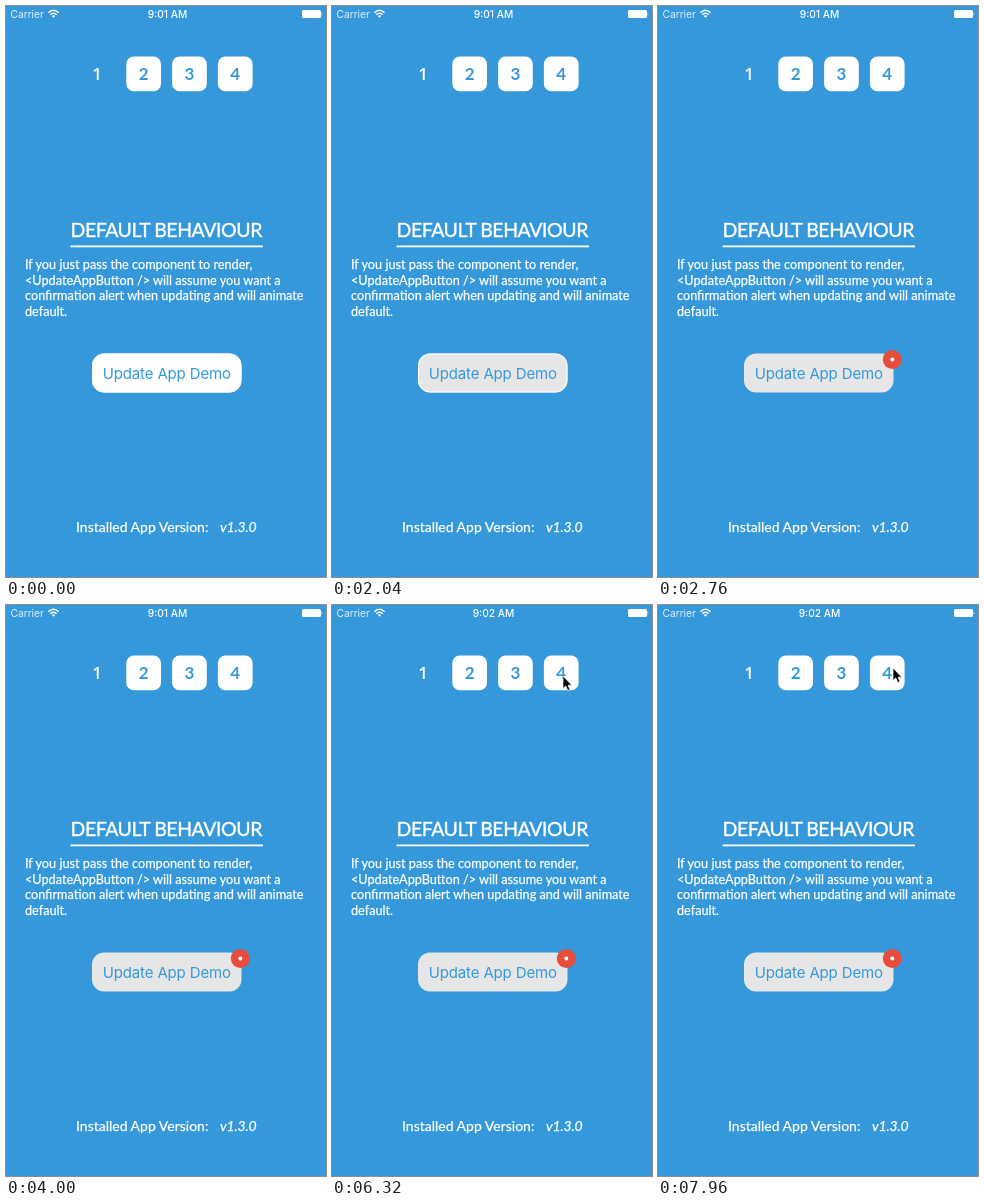
An HTML page for the animation above (8 s loop, 320 by 571 pixels).

```html
<!DOCTYPE html>
<html lang="en">
<head>
<meta charset="utf-8">
<title>Update button demo</title>
<style>
  html, body { margin: 0; width: 100%; height: 100%; overflow: hidden; background: #3498db; }
  svg { display: block; width: 100%; height: 100%; }
  text { fill: #fff; font: 12.7px Lato, sans-serif; white-space: pre; }
  .sturdy { stroke: #fff; stroke-width: .25px; }
  .status { font: 10.2px Inter, sans-serif; }
  .clock { font-weight: 500; text-anchor: middle; }
  .tab { font-size: 17px; font-weight: 700; fill: #3498db; text-anchor: middle; }
  .active { font: 600 17px "Open Sans", sans-serif; fill: #fff; }
  .title { font-size: 19.5px; letter-spacing: -.45px; stroke-width: .4px; }
  .label { font: 15px Inter, sans-serif; letter-spacing: -.15px; fill: #3498db; text-anchor: middle; }
  .version { font-size: 14px; }
  .number { font-style: italic; letter-spacing: -.2px; }
</style>
</head>
<body>
<svg viewBox="0 0 320 571">
  <rect width="320" height="571" fill="#3498db"/>

  <text class="status" x="4.5" y="11.5" opacity=".85">Carrier</text>
  <g fill="none" stroke="#fff" stroke-width="1.5">
    <path d="M42.4 6.7Q47.5 1.9 52.6 6.7M44.3 8.7Q47.5 5.8 50.7 8.7"/>
    <path d="M45.8 9.9Q47.5 8.5 49.2 9.9L47.5 11.8Z" fill="#fff" stroke="none"/>
  </g>
  <text class="status clock" id="clock" x="161.5" y="11.5">9:01 AM</text>
  <rect x="296" y="4" width="19" height="8" rx="1.5" fill="#fff"/>
  <path d="M315.6 6.3q1.7 1.7 0 3.4z" fill="#fff"/>

  <text class="tab active" x="91" y="74">1</text>
  <g id="tabs"></g>

  <text class="title sturdy" x="64.5" y="231">DEFAULT BEHAVIOUR</text>
  <rect x="64.5" y="239.5" width="192.5" height="1.8" fill="#fff"/>
  <text class="sturdy" y="263">
    <tspan x="19">If you just pass the component to render,</tspan>
    <tspan x="19" dy="15.7">&lt;UpdateAppButton /&gt; will assume you want a</tspan>
    <tspan x="19" dy="15.7">confirmation alert when updating and will animate</tspan>
    <tspan x="19" dy="15.7">default.</tspan>
  </text>

  <rect id="button" x="86" y="347.5" width="149.5" height="39" rx="12"/>
  <rect id="edge" x="86.5" y="348" width="148.5" height="38" rx="11.5" fill="none" stroke="#fff"/>
  <text class="label" x="160.8" y="373">Update App Demo</text>
  <g id="badge">
    <circle r="9.5" fill="#e74c3c"/>
    <circle r="2" fill="#fff"/>
  </g>

  <text class="version sturdy" x="70" y="526">Installed App Version:</text>
  <text class="version number sturdy" x="214" y="526">v1.3.0</text>

  <path id="cursor" d="M0 0V12.5L2.8 9.9L4.8 14.5L6.9 13.6L5 9.2H8.8Z"
        fill="#000" stroke="#fff" stroke-width=".7"/>
</svg>
<script>
const LOOP = 8000;
const part = id => document.getElementById(id);
const [clock, tabs, button, edge, badge, cursor] =
  ["clock", "tabs", "button", "edge", "badge", "cursor"].map(part);

tabs.innerHTML = [2, 3, 4].map((n, i) => {
  const x = 120.3 + i * 45.8;
  return `<rect x="${x}" y="50.6" width="34.7" height="34.7" rx="7.5" fill="#fff"/>
    <text class="tab" x="${x + 17.3}" y="74">${n}</text>`;
}).join("");

const progress = (t, from, to) => Math.min(1, Math.max(0, (t - from) / (to - from)));
const ease = p => p * p * (3 - 2 * p);
const mix = (a, b, p) => a + (b - a) * p;
const overshoot = p => 1 + 2.4 * (p - 1) ** 3 + 1.4 * (p - 1) ** 2;

function draw(t) {
  const shade = Math.round(mix(255, 230, ease(progress(t, 1800, 2000))));
  button.setAttribute("fill", `rgb(${shade},${shade},${shade})`);
  edge.setAttribute("opacity", 1 - progress(t, 2050, 2250));

  const size = Math.max(0, overshoot(progress(t, 2200, 2500)));
  badge.setAttribute("transform", `translate(234.3 353.5) scale(${size})`);

  clock.textContent = t < 4700 ? "9:01 AM" : "9:02 AM";

  // The pointer rises to the last tab, then drifts slightly.
  const arrive = ease(progress(t, 5900, 6280));
  const drift = ease(progress(t, 6400, 7000));
  const x = mix(242, 231, arrive) + 4 * drift;
  const y = mix(130, 71, arrive) - 8 * drift;
  cursor.setAttribute("transform", `translate(${x} ${y})`);
  cursor.setAttribute("visibility", t < 5900 ? "hidden" : "visible");
}

const start = performance.now();
function tick() {
  draw((performance.now() - start) % LOOP);
  requestAnimationFrame(tick);
}
tick();
</script>
</body>
</html>
```
